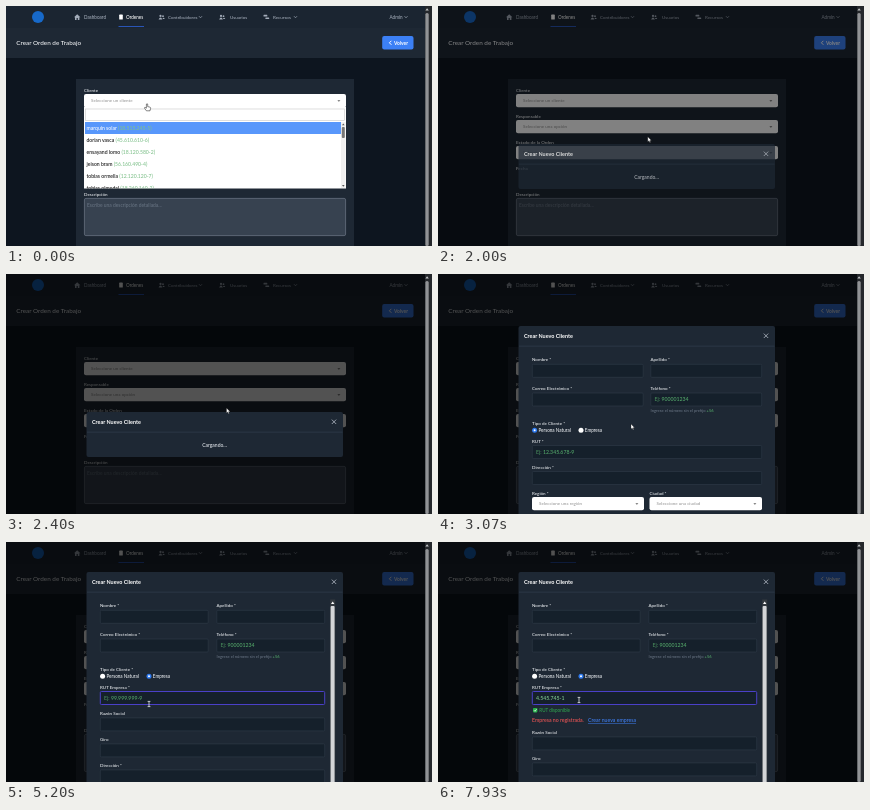
Recreate the animation shown at these times as an HTML page. Size 426x240 px, loop 8000 ms.

```html
<!DOCTYPE html>
<html lang="es">
<head>
<meta charset="utf-8">
<style>
  html, body { margin: 0; width: 100%; height: 100%; overflow: hidden; background: #0d141d; }
  svg { display: block; width: 100%; height: 100%; font-family: Lato, "Open Sans", sans-serif; font-weight: 500; }
  text { white-space: pre; }
</style>
</head>
<body>
<svg id="stage" viewBox="0 0 426 240"></svg>
<script>
const LOOP = 8000;
const PANEL = '#1e2834', FIELD = '#15202b', LINE = '#2f3b49', GREEN = '#55ab6b';
const stage = document.getElementById('stage');

const text = (x, y, s, size = 4.5, fill = '#eef1f4', extra = '') =>
  `<text x="${x}" y="${y}" font-size="${size}" fill="${fill}" ${extra}>${s}</text>`;
const rect = (x, y, w, h, fill, r = 0, stroke = 'none', sw = .6) =>
  `<rect x="${x}" y="${y}" width="${w}" height="${h}" rx="${r}" fill="${fill}" stroke="${stroke}" stroke-width="${sw}"/>`;
const line = (d, stroke, w = .7) => `<path d="${d}" fill="none" stroke="${stroke}" stroke-width="${w}"/>`;
const shape = (d, fill, extra = '') => `<path d="${d}" fill="${fill}" ${extra}/>`;
const dot = (x, y, r, fill) => `<circle cx="${x}" cy="${y}" r="${r}" fill="${fill}"/>`;
const chevron = (x, y) => line(`M${x - 1.5} ${y - .8}l1.5 1.6 1.5-1.6`, '#a3acb9');
const select = (x, y, w, label) =>
  rect(x, y, w, 13.2, '#fff', 2) + text(x + 7, y + 8.2, label, 4.5, '#999') +
  shape(`M${x + w - 8.6} ${y + 6}h3l-1.5 2z`, '#888');

const people = (x, c) => dot(x - 1, 9.9, 1.1, c) + dot(x + 1.5, 10.2, .9, c) +
  shape(`M${x - 2.9} 13.4q1.9-3.8 3.8 0zM${x + 1} 13.1q.9-2.7 2.3 0z`, c);

function navbar() {
  const c = '#a3acb9';
  return rect(0, 0, 419, 22, '#1b2531') + dot(32, 11, 6, '#1769c9') +
    rect(112.5, 20.2, 25.5, .8, '#2f62d8') +
    shape('M68 11.2l3.2-3 3.2 3h-1v2.8h-1.6v-2h-1.2v2h-1.6v-2.8z', c) + text(78, 13, 'Dashboard', 4.6, c) +
    rect(113.2, 8.6, 3.6, 5, '#fff', .6) + text(120, 13, 'Ordenes', 4.6, '#fff') +
    people(155.5, c) + text(162, 12.8, 'Contribuidores', 4.5, c) + chevron(194.5, 11) +
    people(216, c) + text(224, 13, 'Usuarios', 4.5, c) +
    rect(257.5, 8.8, 3.8, 1.6, c, .5) + rect(259.4, 11.4, 3.8, 1.6, c, .5) +
    text(267, 12.8, 'Recursos', 4.5, c) + chevron(289.5, 11) +
    text(383.5, 12.8, 'Admin', 4.6, c) + chevron(400, 11);
}

function page() {
  const selects = [['Cliente', 'Seleccione un cliente'], ['Responsable', 'Seleccione una opción'],
    ['Estado de la Orden', 'Seleccione un estado']];
  return rect(0, 0, 426, 240, '#0d151f') + rect(0, 22, 419, 30, PANEL) + navbar() +
    text(10.3, 39.2, 'Crear Orden de Trabajo', 6.35, '#f1f3f6') +
    rect(376.2, 30, 31.3, 13.6, '#3c80f5', 2) + line('M385.4 34.8l-2 2 2 2', '#fff', 1) +
    text(388, 38.6, 'Volver', 4.9, '#fff', 'font-weight="700"') +
    rect(70, 73, 278, 167, PANEL) +
    selects.map(([label, hint], i) => text(78, 85.7 + 26 * i, label) + select(78, 88 + 26 * i, 262, hint)).join('') +
    text(78, 163.7, 'Fecha') + text(78, 189.7, 'Descripción') +
    rect(78.4, 192.4, 261.2, 37.2, '#374250', 1.5, '#677180', .8) +
    text(81, 200.6, 'Escribe una descripción detallada...', 4.9, '#667281');
}

const clients = [['marquin solar', '(18.515.245-5)'], ['dorian vasca', '(45.610.610-6)'],
  ['ensayand lomo', '(18.120.580-2)'], ['jeison bram', '(56.160.490-4)'],
  ['tobias ormella', '(12.120.120-7)'], ['tobias olmedal', '(18.260.160-2)']];

function dropdown(focus) {
  const rows = clients.map(([name, id], i) => {
    const y = 123.7 + 12 * i;
    return `<text x="80.5" y="${y}" font-size="5.1" fill="${i ? '#151515' : '#fff'}">${name} <tspan fill="#7fc08b">${id}</tspan></text>`;
  }).join('');
  return rect(78, 100.5, 262, 82, '#fff') +
    rect(79.5, 103, 259, 11.6, '#fff', 0, '#c8c8c8') +
    `<g opacity="${focus}">` + rect(79.5, 103, 259, 11.6, '#fff', 0, '#2b5fc4', .9) + '</g>' +
    '<clipPath id="list"><rect x="78" y="116" width="262" height="66.5"/></clipPath><g clip-path="url(#list)">' +
    rect(79, 116, 256, 12, '#5897fb') + rows + '</g>' +
    rect(335, 116, 4.5, 66, '#f0f0f0') + rect(335.8, 121, 3, 11, '#777', 1) +
    shape('M336 119.3h2.6l-1.3-1.8zM336 179h2.6l-1.3 1.8z', '#555');
}

function modalFrame(top, height) {
  const y = top + 9.8;
  return rect(80.5, top, 256.5, height, PANEL, 2) + rect(81, top + 19.8, 255.5, .6, '#344050') +
    text(86, top + 11.7, 'Crear Nuevo Cliente', 5.45, '#fff', 'font-weight="700"') +
    line(`M325.8 ${y - 2.2}l4.4 4.4m0-4.4l-4.4 4.4`, '#b4bcc7', .8);
}

const field = (x, y, w, label, hint = '', active) =>
  text(x, y - .4, label) + rect(x + .3, y + 2.5, w - .6, 13, FIELD, 1, active ? '#4a40c8' : LINE, active ? 1 : .6) +
  text(x + 4, y + 10.9, hint, 5.2, GREEN);
const hintText = s => `<tspan fill="#478a5b">Ej: </tspan>${s}`;
const radio = (x, y, on, label) =>
  dot(x, y, 2.5, on ? '#2f7bf0' : '#fff') + (on ? dot(x, y, 1, '#fff') : '') + text(x + 3.8, y + 1.6, label, 4.6);

function clientForm(top, s) {
  const full = s.company ? 225 : 230, half = s.company ? 108.5 : 111.5, x2 = 94 + full - half;
  const row = n => top + 117 + 26 * n;
  const shift = s.checked ? 19 : 0;
  const rut = s.typed ? `<tspan fill="#83d092">${s.typed}</tspan>` : hintText(s.company ? '99.999.999-9' : '12.345.678-9');
  let out = modalFrame(top, 240) +
    field(94, top + 35.8, half, 'Nombre *') + field(x2, top + 35.8, half, 'Apellido *') +
    field(94, top + 64.5, half, 'Correo Electrónico *') + field(x2, top + 64.5, half, 'Teléfono *', hintText('900001234')) +
    text(x2, top + 86.3, `Ingrese el número sin el prefijo <tspan fill="${GREEN}">+56</tspan>`, 4.1, '#687483') +
    text(94, top + 98.6, 'Tipo de Cliente *') +
    radio(96.6, top + 104.2, !s.company, 'Persona Natural') + radio(143, top + 104.2, s.company, 'Empresa') +
    field(94, row(0), full, s.company ? 'RUT Empresa *' : 'RUT *', rut, s.focus);
  if (!s.company)
    return out + field(94, row(1), full, 'Dirección *') +
      text(94, row(2), 'Región *') + select(94, row(2) + 2, 112, 'Seleccione una región') +
      text(211.5, row(2), 'Ciudad *') + select(211.5, row(2) + 2, 112.5, 'Seleccione una ciudad');
  if (s.caret) out += rect(98.4 + s.typed.replace(/\D/g, '').length * 3.02 + s.typed.replace(/\d/g, '').length * 1.55, top + 123, .6, 6, '#e8edf2');
  if (s.checked)
    out += rect(95, top + 136, 4.4, 4.4, '#27b34a', .8) + line(`M96 ${top + 138.2}l1 1.1 1.6-2.2`, '#fff') +
      text(101.3, top + 139.9, 'RUT disponible', 4.6, '#2fa34d') +
      text(94, top + 150.3, 'Empresa no registrada.', 5.2, '#ee5555') +
      text(150, top + 150.3, 'Crear nueva empresa', 5.2, '#3f7ef0', 'text-decoration="underline"');
  return out + ['Razón Social', 'Giro', 'Dirección *'].map((label, i) => field(94, row(i + 1) + shift + .4, full, label)).join('') +
    rect(324.2, top + 27.5, 5, 190, '#33393f') + rect(324.6, top + 34, 4, 180, '#d3d5d8', 1) +
    shape(`M325 ${top + 32}h3.4l-1.7-2.4z`, '#fff');
}

// Thousands dots plus a check digit, reformatted on each key.
const formatRut = d => d.length < 2 ? d : d.slice(0, -1).replace(/\B(?=(\d{3})+$)/g, '.') + '-' + d.slice(-1);

const clamp = v => Math.min(1, Math.max(0, v));
const ease = v => { v = clamp(v); return v * v * (3 - 2 * v); };

// Moves: start, end, x, y
const moves = [[70, 500, 141, 110], [1670, 2100, 220.5, 134], [2600, 3070, 193, 150], [3070, 3400, 166, 154],
  [3470, 3760, 143, 156], [4670, 5130, 143, 162], [5670, 6100, 141, 158]];

function pointer(t) {
  let x = 141, y = 98;
  for (const [start, end, px, py] of moves) {
    const k = ease((t - start) / (end - start));
    x += (px - x) * k;
    y += (py - y) * k;
  }
  const kind = t < 260 ? 'hand' : t < 1740 ? 'beam' : t < 3650 ? 'arrow' : t < 3870 ? 'hand' : 'beam';
  const art = {
    hand: shape('M-.6 0q.8-.7 1.3 0v2.6l2.4.6q.7.3.5 1.2l-.6 2.4h-3.6l-2-2.8q.1-.9 1-.5l1 .7z', '#fff', 'stroke="#111" stroke-width=".5"'),
    beam: line('M-1.4-2.6h2.8M0-2.6v5.2M-1.4 2.6h2.8', t < 1740 ? '#222' : '#fff', .7),
    arrow: shape('M0 0v5l1.2-1 .8 1.8.8-.4-.8-1.7h1.6z', '#fff', 'stroke="#111" stroke-width=".3"')
  };
  return `<g transform="translate(${x.toFixed(2)} ${y.toFixed(2)})">${art[kind]}</g>`;
}

function scene(t) {
  let out = page();
  if (t < 1870) out += dropdown(ease((t - 70) / 200));
  const shown = ease((t - 1870) / 200);
  if (shown) {
    out += rect(0, 0, 419, 240, `rgba(0,0,0,${.68 * shown})`);
    const keys = Math.floor(clamp((t - 6375) / 760) * 8);
    const company = t >= 3870;
    out += `<g opacity="${shown}">` + (t < 2600
      ? modalFrame(138, 45) + text(208.5, 172.7, 'Cargando...', 5, '#e3e7ec', 'text-anchor="middle"')
      : clientForm(company ? 30 : 52, {
          company,
          focus: t >= 4730,
          typed: formatRut('45457451'.slice(0, keys)),
          caret: keys > 0 && t < 7660,
          checked: t >= 7470
        })) + '</g>';
  }
  return out + rect(419, 0, 7, 240, '#25282c') + rect(419.4, 7, 3.3, 233, '#919396', 1.5) +
    shape('M419.4 4.6h3.4l-1.7-2.4z', '#c4c6c8') + pointer(t);
}

let last = '';
function frame(now) {
  const next = scene(now % LOOP);
  if (next !== last) stage.innerHTML = last = next;
  requestAnimationFrame(frame);
}
requestAnimationFrame(frame);
</script>
</body>
</html>
```
